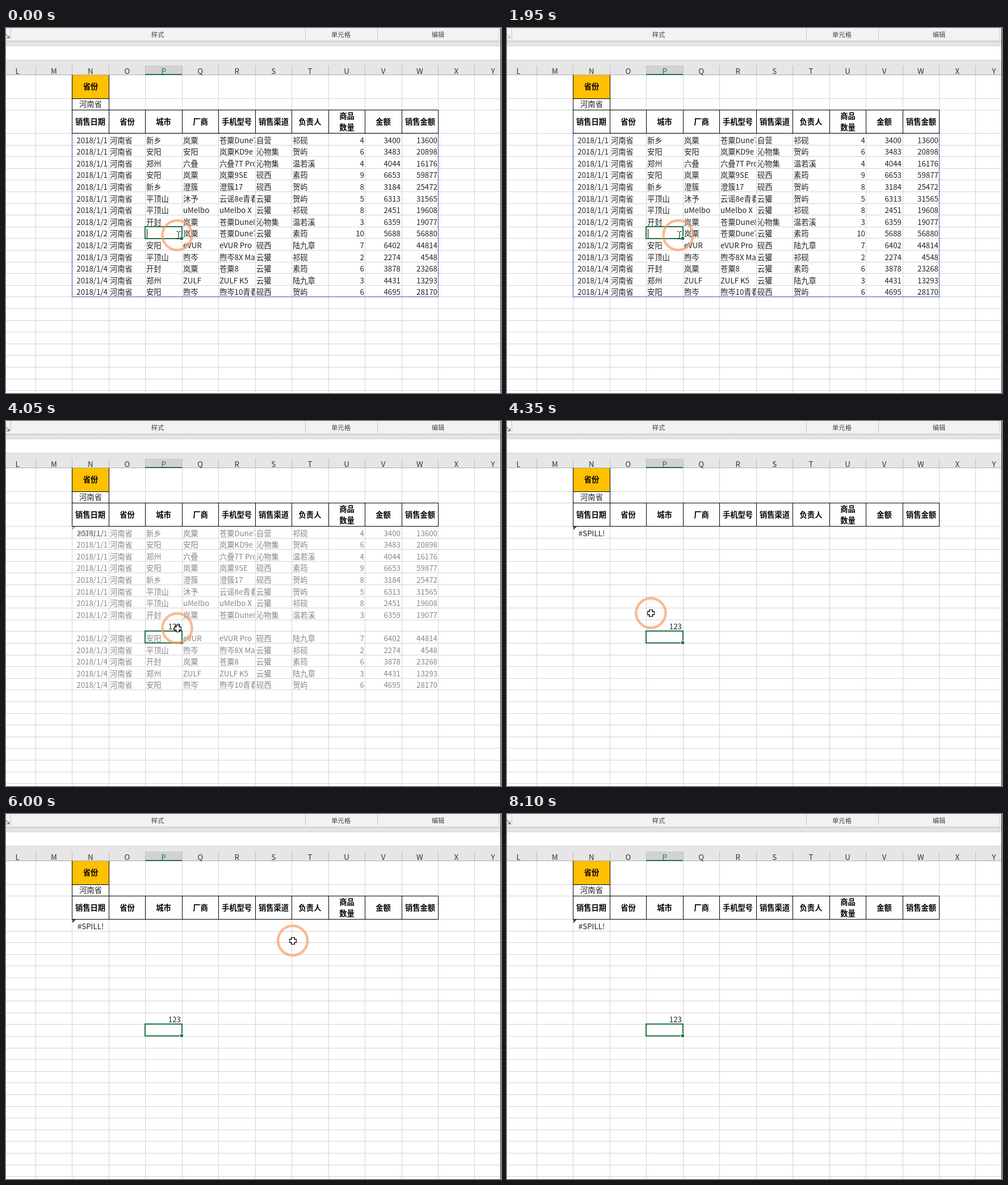
An HTML page with a canvas for the animation above (8.25 s loop, 872 by 643 pixels).

```html
<!DOCTYPE html>
<html lang="zh-CN">
<head>
<meta charset="utf-8">
<title>Spill range</title>
<style>
html, body { margin: 0; width: 100%; height: 100%; overflow: hidden; background: #fff; }
canvas { display: block; }
</style>
</head>
<body>
<canvas id="stage" width="872" height="643"></canvas>
<script>
const ctx = document.getElementById('stage').getContext('2d');
const LOOP = 8250, STEP = 150, ENTER = 3900, FADE = 330;
const FAMILY = '"Noto Sans CJK SC", "Noto Sans CJK", sans-serif';
const GREEN = '#217346', INK = '#222';

const colX = i => Math.round(52.5 + 64.45 * i - 0.5);   // 0 = column M, 1 = N
const rowY = i => Math.round(185 + 20.6 * i);           // 0 = first data row
const EDIT_ROW = 8, EDIT_COL = 3;

const headers = ['销售日期', '省份', '城市', '厂商', '手机型号', '销售渠道', '负责人', '商品|数量', '金额', '销售金额'];
// day, city, maker, model, channel, person, count, price
const rows = `
1,新乡,岚粟,苍粟Dune7 Pro,自营,祁砚,4,3400
1,安阳,安阳,岚粟KD9e,沁物集,贺屿,6,3483
1,郑州,六叠,六叠7T Pro,沁物集,温若溪,4,4044
1,安阳,岚粟,岚粟9SE,砚西,素筠,9,6653
1,新乡,澄簇,澄簇17,砚西,贺屿,8,3184
1,平顶山,沐予,云谣8e青春版,云獾,贺屿,5,6313
1,平顶山,uMelbo,uMelbo X,云獾,祁砚,8,2451
2,开封,岚粟,苍粟Dune8 Pro,沁物集,温若溪,3,6359
2,,岚粟,苍粟Dune7 Pro,云獾,素筠,10,5688
2,安阳,eVUR,eVUR Pro,砚西,陆九章,7,6402
3,平顶山,煦岑,煦岑8X Max,云獾,祁砚,2,2274
4,开封,岚粟,苍粟8,云獾,素筠,6,3878
4,郑州,ZULF,ZULF K5,云獾,陆九章,3,4431
4,安阳,煦岑,煦岑10青春版,砚西,贺屿,6,4695`.trim().split('\n').map(line => {
  const [day, city, maker, model, channel, person, count, price] = line.split(',');
  return ['2018/1/' + day, '河南省', city, maker, model, channel, person, count, price, String(count * price)];
});

// time, x, y of the pointer
const path = [
  [0, 301.5, 365], [4200, 301.5, 365], [4650, 116, 262], [5100, 164, 246], [5400, 137, 226],
  [6300, 634, 222], [6750, 646, 224], [6900, 660, 212], [7350, 910, 78], [LOOP, 910, 78]
];

function pointerAt(t) {
  const i = path.findIndex(p => p[0] > t);
  const [t0, x0, y0] = path[i - 1], [t1, x1, y1] = path[i];
  const u = (t - t0) / (t1 - t0), k = u * u * (3 - 2 * u);
  return [x0 + (x1 - x0) * k, y0 + (y1 - y0) * k];
}

function rect(x, y, w, h, color) {
  ctx.fillStyle = color;
  ctx.fillRect(x, y, w, h);
}

function frame(x0, y0, x1, y1, color, width = 1) {
  ctx.strokeStyle = color;
  ctx.lineWidth = width;
  const o = width % 2 / 2;
  ctx.strokeRect(x0 + o, y0 + o, x1 - x0, y1 - y0);
}

function text(str, x, centerY, { align = 'center', color = INK, size = 13.3, bold = false } = {}) {
  ctx.font = `${bold ? 'bold ' : ''}${size}px ${FAMILY}`;
  ctx.textAlign = align;
  ctx.fillStyle = color;
  ctx.fillText(str, x, centerY + size * 0.37);
}

function lines(color, width, ...polylines) {
  ctx.strokeStyle = color;
  ctx.lineWidth = width;
  ctx.beginPath();
  for (const points of polylines) points.forEach(([x, y], i) => i ? ctx.lineTo(x, y) : ctx.moveTo(x, y));
  ctx.stroke();
}

function drawRibbon(editing) {
  rect(0, 0, 872, 22, '#f3f2f1');
  const shade = ctx.createLinearGradient(0, 22, 0, 31);
  shade.addColorStop(0, '#d2d2d2');
  shade.addColorStop(0.5, '#e3e3e3');
  shade.addColorStop(1, '#e6e6e6');
  rect(0, 22, 872, 9, shade);
  for (const x of [8, 527, 654, 868]) rect(x, 0, 1, 20, '#c8c6c4');
  text('样式', 267, 12, { size: 11.3, color: '#444' });
  text('单元格', 590, 12, { size: 11.3, color: '#444' });
  text('编辑', 761, 12, { size: 11.3, color: '#444' });
  lines(editing ? '#b5b3b1' : '#444', 1, [[0, 11.5], [2, 11.5]], [[1, 13], [5, 17]], [[5.5, 13], [5.5, 17.5], [1, 17.5]]);
  rect(0, 31, 872, 26, '#d0d0d0');
  rect(0, 32, 872, 24, '#fff');
}

function drawGrid() {
  rect(0, 57, 872, 26, '#e6e6e6');
  rect(colX(EDIT_COL), 66, 65, 16, '#d2d2d2');
  for (let i = 0; i < 13; i++) {
    rect(colX(i), 66, 1, 17, '#bdbdbd');
    rect(colX(i), 83, 1, 560, '#d4d4d4');
  }
  rect(0, 82, 872, 1, '#ababab');
  rect(colX(EDIT_COL), 81, 65, 2, GREEN);
  [...'LMNOPQRSTUVWXY'].forEach((letter, i) =>
    text(letter, 20 + i * 64.45, 76, { color: letter === 'P' ? GREEN : '#333' }));
  rect(0, 124, 872, 1, '#d4d4d4');
  rect(0, 144, 872, 1, '#d4d4d4');
  for (let i = 0; i < 23; i++) rect(0, rowY(i), 872, 1, '#d4d4d4');
}

function drawTableHead() {
  rect(117, 83, 64, 41, '#ffc000');
  lines('#000', 1, [[116.5, 82.5], [116.5, 144.5]], [[181.5, 83], [181.5, 144.5]], [[116.5, 124.5], [181.5, 124.5]]);
  text('省份', 149, 103, { bold: true, color: '#000' });
  text('河南省', 149, 134.5);
  headers.forEach((label, i) => {
    const x = colX(i + 1), parts = label.split('|');
    frame(x, 144, colX(i + 2), 185, '#000');
    parts.forEach((part, n) => text(part, x + 32.5, parts.length > 1 ? 155 + n * 20.5 : 165, { bold: true, color: '#000' }));
  });
}

function drawRows(entered, alpha) {
  ctx.globalAlpha = alpha;
  rows.forEach((row, r) => {
    if (entered && r === EDIT_ROW) return;
    row.forEach((value, c) => {
      const x = colX(c + 1), right = c === 0 || c > 6;
      ctx.save();
      ctx.beginPath();
      ctx.rect(x, rowY(r), 64.5, 21);
      ctx.clip();
      text(value, right ? x + 63 : x + 2, 197.6 + 20.6 * r, { align: right ? 'right' : 'left' });
      ctx.restore();
    });
  });
  ctx.globalAlpha = 1;
}

function drawSpillBorder() {
  ctx.save();
  ctx.shadowColor = 'rgba(60, 90, 150, .45)';
  ctx.shadowBlur = 4;
  frame(116, 185, 761, 473, '#4a6ea9');
  ctx.restore();
  rect(116, 185, 646, 1, '#000');
}

function drawSpillError(alpha) {
  ctx.globalAlpha = alpha;
  ctx.fillStyle = '#1a6b1a';
  ctx.beginPath();
  ctx.moveTo(117, 186);
  ctx.lineTo(123, 186);
  ctx.lineTo(117, 192);
  ctx.fill();
  text('#SPILL!', 149, 197.6);
  ctx.globalAlpha = 1;
}

function drawSelection(row) {
  const x = colX(EDIT_COL), y = rowY(row);
  frame(x, y, x + 65, y + 21, GREEN, 2);
  rect(x + 61, y + 17, 7, 7, '#fff');
  rect(x + 62, y + 18, 5, 5, GREEN);
}

function drawEditor(t) {
  const typed = '123'.slice(0, Math.max(0, Math.floor((t - 2250) / 150)));
  rect(246, 350, 64, 21, '#fff');
  drawSelection(EDIT_ROW);
  text(typed, 248, 362.4, { align: 'left' });
  const caretX = 248 + Math.round(ctx.measureText(typed).width);
  const blinkOn = (t + 200) % 1060 < 530;
  if (blinkOn || (t >= 2400 && t < 3450)) rect(caretX, 354, 1, 16, '#000');
}

function drawPointer(x, y, editing) {
  ctx.strokeStyle = 'rgba(247, 150, 90, .66)';
  ctx.lineWidth = 4.5;
  ctx.beginPath();
  ctx.arc(x, y, 26, 0, 2 * Math.PI);
  ctx.stroke();
  if (editing) {
    lines('#000', 1, [[300.5, 358.5], [303, 358.5]], [[305, 358.5], [307.5, 358.5]],
      [[304, 359], [304, 371]], [[300.5, 371.5], [303, 371.5]], [[305, 371.5], [307.5, 371.5]]);
    return;
  }
  const cx = Math.round(x) + 0.5, cy = Math.round(y) + 0.5;
  const plus = (long, thick, color) => {
    rect(cx - thick / 2, cy - long / 2, thick, long, color);
    rect(cx - long / 2, cy - thick / 2, long, thick, color);
  };
  plus(13, 7, '#000');
  plus(11, 3, '#fff');
  rect(cx - 2.5, cy - 5.5, 5, 11, '#000');
  rect(cx - 5.5, cy - 2.5, 11, 5, '#000');
  plus(11, 4, '#fff');
}

function draw(t) {
  const editing = t < ENTER;
  const alpha = editing ? 1 : Math.max(0, 1 - (t - ENTER) / FADE);
  rect(0, 0, 872, 643, '#fff');
  drawRibbon(editing && t >= STEP);
  drawGrid();
  drawTableHead();
  if (alpha > 0) drawRows(!editing, alpha);
  if (editing) {
    drawSpillBorder();
    drawEditor(t);
  } else {
    drawSpillError(1 - alpha);
    text('123', 308, 362.4, { align: 'right' });
    drawSelection(EDIT_ROW + 1);
  }
  drawPointer(...pointerAt(t), editing);
  rect(871, 0, 1, 643, '#222');
}

function tick() {
  const t = performance.now() % LOOP;
  draw(Math.floor(t / STEP) * STEP);
  requestAnimationFrame(tick);
}
tick();
</script>
</body>
</html>
```
